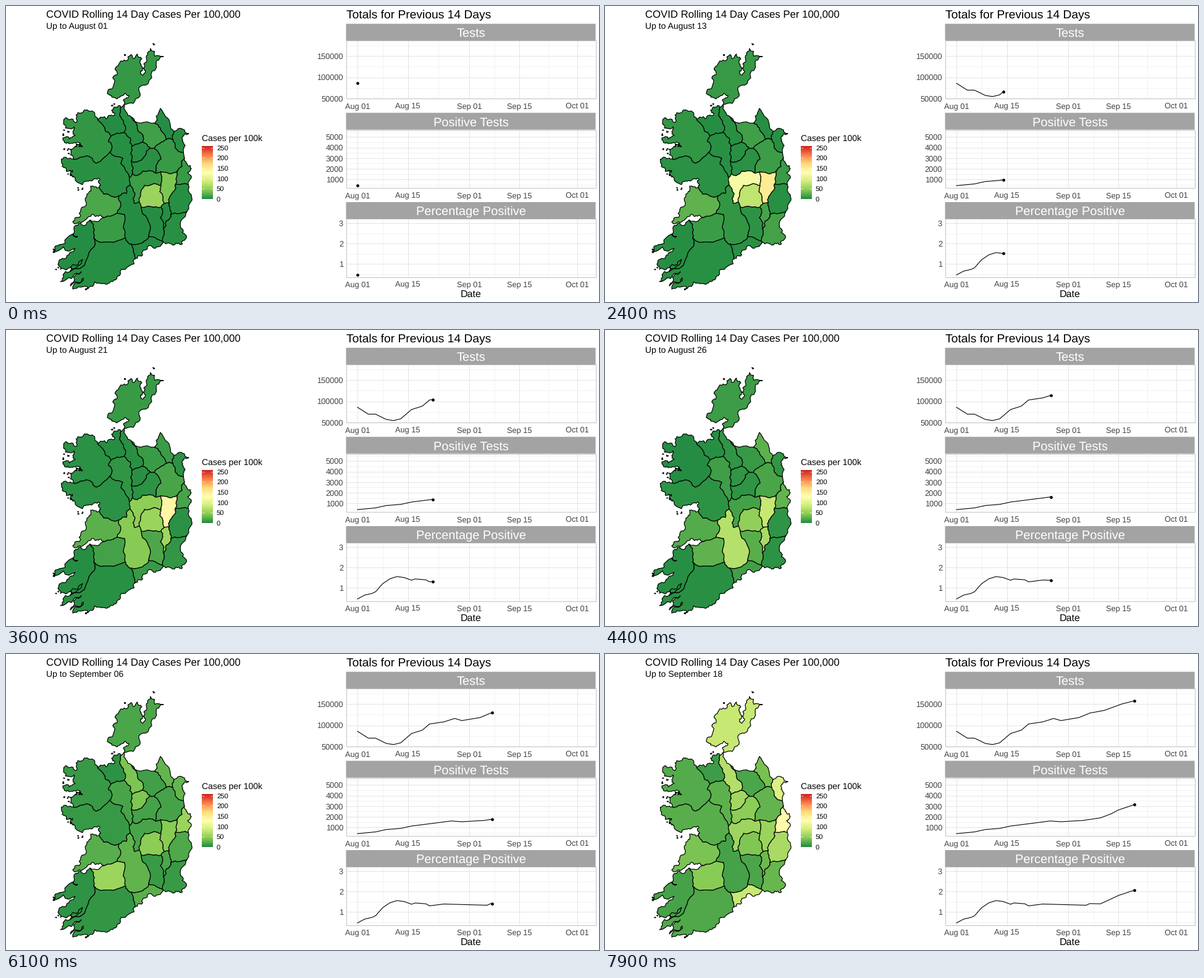
Write a matplotlib script that moves like this. It is 960 by 480 pixels and loops after 8000 ms.

```python
import numpy as np
import matplotlib.pyplot as plt
from matplotlib.animation import FuncAnimation
from matplotlib.colors import LinearSegmentedColormap
from matplotlib.patches import Polygon, Rectangle

plt.rcParams.update({"font.family": "Liberation Sans", "text.hinting": "none",
                     "text.hinting_factor": 8})
PX = 0.75  # points per pixel
FRAMES = 80
rng = np.random.default_rng(4)

fig = plt.figure(figsize=(10, 5), dpi=96, facecolor="white")
ax = fig.add_axes([0, 0, 1, 1])


def text(x, y, s, size, color="black", ha="left"):
    return ax.text(x, y, s, fontsize=size * PX, color=color, ha=ha, va="baseline")


def line(x, y, color="black", width=1.1, **kw):
    return ax.plot(x, y, color=color, lw=width * PX, **kw)[0]


# ---------- map: lettered junctions, fractal edges between them ----------
nodes, edges = {}, {}


def place(names, *xy):
    nodes.update(zip(names, np.reshape(xy, (-1, 2)).astype(float)))


def edge(key, *via, rough=0.17, depth=2):
    """Path between two junctions, roughened by midpoint displacement."""
    p = np.vstack([nodes[key[0]], np.reshape(via, (-1, 2)), nodes[key[1]]])
    for _ in range(depth):
        d = np.diff(p, axis=0)
        shift = rng.uniform(-rough, rough, (len(d), 1))
        mid = (p[1:] + p[:-1]) / 2 + np.c_[-d[:, 1], d[:, 0]] * shift
        p = np.insert(p, np.arange(1, len(p)), mid, axis=0)
    edges[key] = p


def coast(key, *via):
    edge(key, *via, rough=0.32, depth=3)


def ring(names):
    pts = []
    for a, b in zip(names, names[1:] + names[0]):
        if a + b not in edges and b + a not in edges:
            edge(a + b, depth=3)
        pts.extend(edges[a + b] if a + b in edges else edges[b + a][::-1])
    return np.array(pts)


# junctions on the outline, then inland
place("ABCDEFGHIJ", 191, 160, 186, 164, 148, 183, 111, 249, 151, 294, 164, 341,
      136, 347, 103, 431, 209, 410, 253, 381)
place("KLMNOPQRS", 293, 333, 295, 289, 289, 246, 287, 238, 285, 199, 272, 204,
      240, 190, 203, 180, 237, 105)
place("abcdefghijklm", 221, 221, 204, 228, 191, 205, 170, 211, 168, 237, 200, 279,
      201, 290, 183, 308, 180, 336, 142, 376, 193, 376, 197, 383, 231, 373)
place("nopqrstuvwxyz", 219, 326, 216, 318, 205, 272, 242, 271, 250, 269, 251, 291,
      256, 320, 251, 326, 255, 362, 264, 319, 267, 338, 274, 289, 277, 268)
place("01234", 270, 216, 260, 216, 240, 231, 233, 230, 203, 252)

coast("AS", 190, 153, 199, 145, 186, 146, 172, 148, 164, 142, 174, 129, 173, 117,
      179, 112, 177, 104, 186, 89, 202, 79, 207, 85, 213, 78, 220, 86, 219, 95, 221, 104,
      218, 110, 226, 107, 223, 94, 229, 76, 234, 69, 255, 82, 243, 96)
coast("BC", 171, 169, 176, 174, 162, 183)
coast("CD", 144, 178, 116, 173, 113, 189, 97, 181, 96, 198, 110, 196, 112, 210, 92, 214,
      100, 221, 120, 222, 124, 228, 103, 232)
coast("DE", 93, 246, 91, 260, 108, 267, 104, 275, 131, 284, 150, 279, 153, 291)
coast("EF", 137, 292, 131, 305, 121, 330, 108, 350, 133, 342, 150, 341)
coast("GH", 121, 352, 108, 370, 116, 374, 86, 387, 76, 399, 112, 393, 98, 407, 84, 419,
      88, 427, 104, 424, 124, 411)
coast("HI", 88, 447, 122, 431, 104, 454, 125, 441, 108, 459, 133, 458, 158, 450, 172, 447,
      184, 437, 200, 421)
coast("IJ", 221, 404, 223, 396, 242, 393)
coast("KJ", 286, 362, 289, 380, 284, 387, 265, 385)
coast("ML", 294, 258, 300, 264, 294, 270)
coast("ON", 296, 207, 286, 211, 285, 219, 290, 226)
edge("LK", 300, 306, 301, 315)

# borders that bend
edge("SA", 230, 126, 215, 133, 217, 146, 206, 158)
edge("QP", 245, 185, 243, 179, 250, 166, 258, 179, 266, 192)
edge("RQ", 218, 190)
edge("Ra", 213, 200, 222, 210)
edge("cB", 190, 186, 184, 178)
edge("Cd", 156, 192)
edge("De", 130, 243, 146, 255)
edge("ed", 172, 228, 166, 220)
edge("ef", 189, 247, 186, 256)
edge("gh", 195, 297, 195, 304)
edge("Eh", 158, 305)
edge("hi", 186, 321)
edge("Gj", 143, 363)
edge("ki", 190, 360, 192, 338)
edge("Hj", 130, 412, 143, 390)
edge("lm", 203, 386, 221, 384)
edge("mn", 233, 365, 229, 345)
edge("go", 209, 304, 206, 312, 208, 320)
edge("so", 240, 288, 224, 291, 219, 299)
edge("st", 249, 301)
edge("wy", 265, 309, 275, 295)
edge("uv", 254, 335, 250, 343)
edge("zM", 285, 260, 284, 252)
edge("1Q", 256, 208, 250, 198)
edge("q2", 243, 264, 251, 248)
edge("N0", 274, 230)
edge("43", 212, 253, 225, 243)
edge("pq", 213, 275, 221, 268)

STOPS = [(33, 139, 66), (135, 203, 84), (211, 237, 121), (255, 255, 177),
         (254, 218, 121), (250, 125, 73), (205, 33, 31)]
cmap = LinearSegmentedColormap.from_list("cases", np.array(STOPS) / 255, 512)
TOP = 258
counties = []


def county(names, start, end, wave=0, when=40):
    """Outline plus its rate: a late rise from start to end and one wave."""
    patch = Polygon(ring(names), fc="white", ec="black", lw=1.2 * PX, joinstyle="round")
    counties.append((ax.add_patch(patch), start, end, wave, when))


def rate(i, start, end, wave, when):
    rise = (i / (FRAMES - 1)) ** 5
    return start + (end - start) * rise + wave * np.exp(-((i - when) / 14) ** 2)


county("AS", 9, 86, -14, 66)
county("ARabcB", 3, 48, 33, 69)
county("BcdC", 2, 12)
county("CdeD", 8, 22, -7, 46)
county("dcb4pfe", 3, 25, 12, 52)
county("DefghE", 4, 24)
county("EhiF", 18, 38, 9, 28)
county("FikjG", 11, 40, 38, 58)
county("GjH", 2, 16)
county("HjklI", 3, 20)
county("IlmJ", 2, 80, 8, 42)
county("ghiklmno", 2, 15, 68, 46)
county("nmJvu", 2, 18, 21, 43)
county("uvxwt", 2, 32, 62, 41)
county("JvxK", 3, 30, 12, 22)
county("KxwyL", 3, 62)
county("LyzM", 10, 135, 15, 52)
county("Mzrq210N", 10, 28, 7, 40)
county("N0PO", 3, 95)
county("PQ10", 2, 36, 28, 51)
county("QRa321", 14, 18, -5, 46)
county("ab43", 3, 40, 34, 68)
county("34pq2", 4, 46)
county("pfgosrq", 2, 56, 120, 22)
county("ostun", 48, 40, 32, 18)
county("rstwyz", 38, 54, 128, 29)


def islets(x, y, spread, count):
    for cx, cy in rng.uniform(-spread, spread, (count, 2)) + (x, y):
        ang = np.linspace(0, 2 * np.pi, 6, endpoint=False)
        r = rng.uniform(0.5, 1.6, 6)
        ax.add_patch(Polygon(np.c_[cx + 1.3 * r * np.cos(ang), cy + r * np.sin(ang)],
                             fc="black", ec="black", lw=0.5 * PX))


islets(239, 62, 1, 2)
islets(192, 79, 1, 2)
islets(175, 162, 5, 2)
islets(97, 205, 5, 5)
islets(97, 236, 5, 5)
islets(117, 225, 3, 4)
islets(106, 273, 6, 5)
islets(121, 294, 5, 4)
islets(79, 396, 4, 3)
islets(83, 426, 2, 2)
islets(130, 460, 2, 3)

text(65, 18, "COVID Rolling 14 Day Cases Per 100,000", 16.8)
subtitle = text(65, 37, "", 14)

# ---------- legend ----------
text(317, 219, "Cases per 100k", 14)
ax.imshow(np.linspace(1, 0, 256)[:, None], cmap=cmap, extent=(317, 335, 313, 227),
          aspect="auto", interpolation="bilinear")
for v in range(0, 251, 50):
    y = 313 - v * 86 / TOP
    for x in (317, 331.4):
        line([x, x + 3.6], [y, y], "white", 0.6, solid_capstyle="butt")
    text(341, y + 4, str(v), 11.2)

# ---------- charts ----------
LEFT, RIGHT, DAY0, STEP = 551, 954.5, 569, 5.83
DATES = {0: "Aug 01", 14: "Aug 15", 31: "Sep 01", 45: "Sep 15", 61: "Oct 01"}
GREY, INK = "#a3a3a3", "#414141"
xticks = [DAY0 + STEP * d for d in DATES]
series = []


def chart(title, strip, bottom, y0, gap, tick, count, keys):
    """One facet; keys maps a day to a value, tick is the value of one grid step."""
    top = strip + 27.3
    box = [top, bottom]
    ys = [y0 - gap * n for n in range(count)]
    for x in np.add(xticks[1:], xticks[:-1]) / 2:
        line([x, x], box, "#efefef", 0.7)
    for y in np.arange(y0 + gap / 2, top, -gap):
        if y < bottom:
            line([LEFT, RIGHT], [y, y], "#efefef", 0.7)
    for x, label in zip(xticks, DATES.values()):
        line([x, x], box, "#e2e2e2", 0.9)
        text(x, bottom + 15.8, label, 12.8, INK, "center")
    for n, y in enumerate(ys, 1):
        line([LEFT, RIGHT], [y, y], "#e2e2e2", 0.9)
        text(546, y + 4.7, str(tick * n), 12.8, INK, "right")
    ax.add_patch(Rectangle((LEFT, top), RIGHT - LEFT, bottom - top, fc="none",
                           ec="#bdbdbd", lw=0.9 * PX, zorder=2.5))
    ax.add_patch(Rectangle((LEFT - 0.5, strip), RIGHT - LEFT + 0.5, top - strip, fc=GREY,
                           lw=0, snap=False, zorder=2.6))
    text((LEFT + RIGHT) / 2, strip + 21.2, title, 20, "white", "center")
    series.append((list(keys), [y0 - gap * (v / tick - 1) for v in keys.values()],
                   line([], [], zorder=3),
                   line([], [], zorder=4, marker="o", ms=4.8 * PX, mew=0)))


chart("Tests", 28.8, 150.3, 150.3, 34.7, 50000, 3,
      {0: 86000, 3: 70000, 5: 70000, 8: 57600, 10: 55000, 12: 59000, 15: 80700,
       18: 88600, 20: 103000, 24: 108000, 27: 116000, 29: 111000, 34: 118000,
       37: 128500, 41: 134700, 46: 150000, 50: 158500})
chart("Positive Tests", 173.2, 295, 281.2, 17.2, 1000, 5,
      {0: 413, 5: 575, 8: 800, 12: 907, 15: 1128, 20: 1343, 26: 1605, 29: 1535,
       35: 1650, 40: 1900, 43: 2290, 45: 2650, 49: 3105, 50: 3250})
chart("Percentage Positive", 318, 439.7, 418.3, 33, 1, 3,
      {0: 0.46, 2: 0.65, 4: 0.73, 5: 0.81, 7: 1.21, 9: 1.45, 11: 1.56, 13: 1.51,
       15: 1.38, 16: 1.44, 19: 1.40, 20: 1.30, 24: 1.39, 36: 1.33, 37: 1.41, 40: 1.40,
       45: 1.81, 48: 1.99, 50: 2.1})

text(551, 20, "Totals for Previous 14 Days", 19.2)
text(752.5, 472, "Date", 16, ha="center")

ax.set(xlim=(0, 960), ylim=(480, 0))
ax.axis("off")


def update(i):
    for patch, *params in counties:
        patch.set_facecolor(cmap(max(0, rate(i, *params)) / TOP))
    n = max(0, int(np.floor(0.65 * i - 2.85)))
    subtitle.set_text(f"Up to August {n + 1:02d}" if n < 31
                      else f"Up to September {n - 30:02d}")
    head = max(0, 0.662 * (i - 4.4))
    days = np.append(np.arange(np.ceil(head)), head)
    x = DAY0 + STEP * days
    for key_days, key_ys, path, dot in series:
        y = np.interp(days, key_days, key_ys)
        path.set_data(x, y)
        dot.set_data(x[-1:], y[-1:])
    return []


anim = FuncAnimation(fig, update, frames=FRAMES, interval=100, repeat=True)
plt.show()
```
